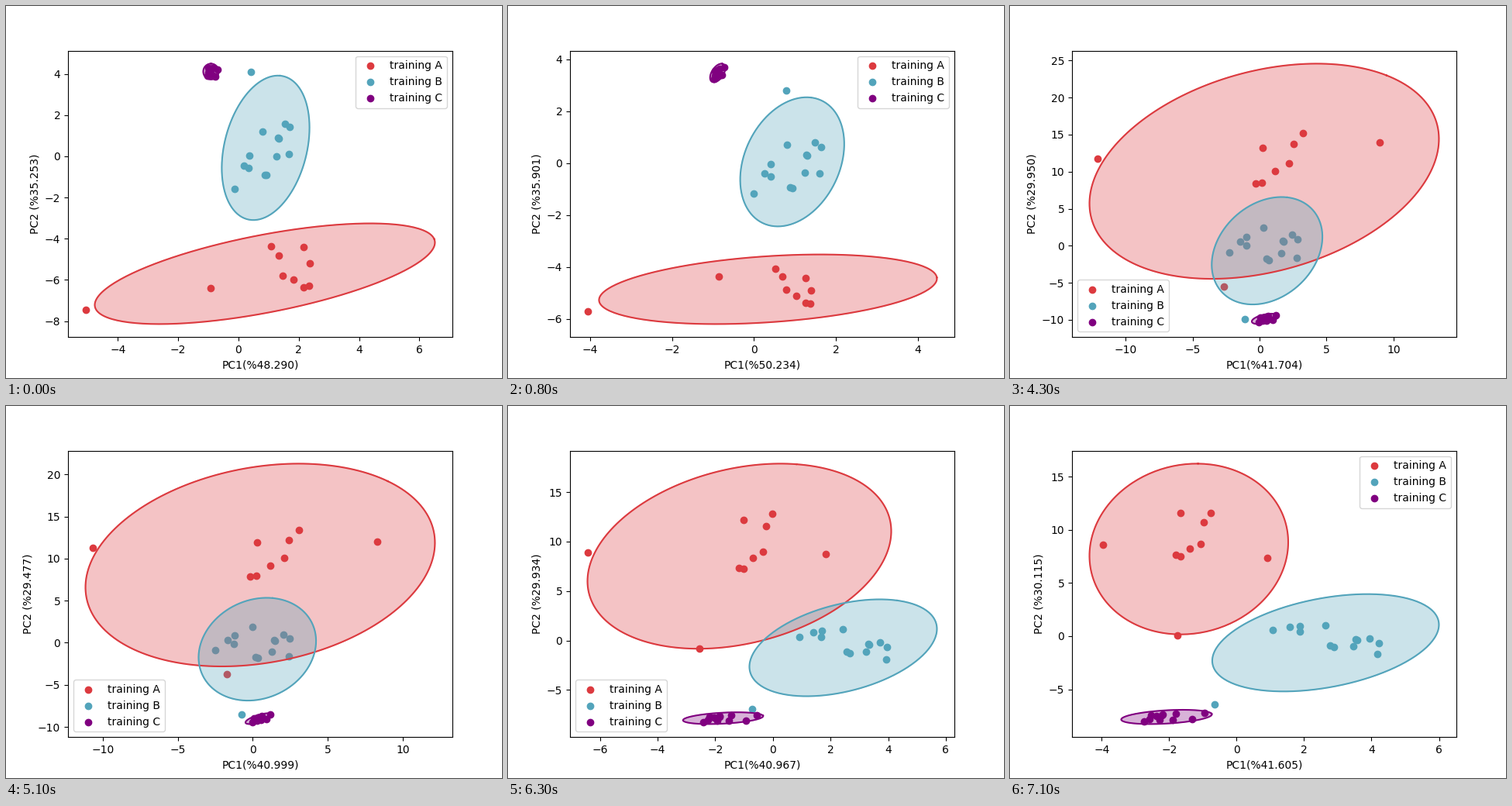
Recreate the animation shown at these times as a matplotlib script. Size 640 by 480 pixels, loop 8000 ms.

```python
import numpy as np
import matplotlib.pyplot as plt
from matplotlib.animation import FuncAnimation

STEP_MS = 100
FRAMES = 80
SECOND_START = 43
GROUPS = [("training A", "#dc3a3f", 10), ("training B", "#53a4bb", 14), ("training C", "purple", 11)]
CHI = np.sqrt(5.991)  # 95 % confidence, two degrees of freedom


def crowd(seed, count, center, half, rho, *outliers):
    """Scatter points around the outliers so that all together span the given ellipse."""
    center, (sx, sy) = np.array(center), np.array(half) / CHI
    spread = (count - 1) * np.array([[sx * sx, rho * sx * sy], [rho * sx * sy, sy * sy]])
    far = np.reshape(outliers, (-1, 2)) - center
    inner = count - len(far)
    shift = -far.sum(0) / inner
    rest = spread - far.T @ far - inner * np.outer(shift, shift)
    noise = np.random.default_rng(seed).uniform(-1, 1, (inner, 2))
    basis = np.linalg.qr(noise - noise.mean(0))[0]
    return np.vstack([far, shift + basis @ np.linalg.cholesky(rest).T]) + center


def pose(step, ratios, *ellipses):
    clouds = [crowd(seed, group[2], *ellipse)
              for seed, (group, ellipse) in enumerate(zip(GROUPS, ellipses))]
    return step, [np.array(ratios), *clouds]


# Each ellipse: center, half extents, correlation, then any outliers.
FIRST_RUN = [
    pose(0, (48.290, 35.253),
         ((0.874, -5.70), (5.642, 2.444), 0.62, (-5.076, -7.45)),
         ((0.90, 0.414), (1.455, 3.508), 0.28, (0.41, 4.10)),
         ((-0.913, 4.117), (0.257, 0.384), 0)),
    pose(5, (49.387, 35.650),
         ((0.266, -5.314), (4.473, 1.219), 0.28, (-4.655, -6.01)),
         ((0.838, 0.057), (1.213, 2.932), 0.25, (0.58, 3.46)),
         ((-0.833, 3.749), (0.19, 0.368), 0.5)),
    pose(12, (51.363, 36.236),
         ((0.444, -4.257), (3.713, 1.523), 0.32, (-3.285, -5.30)),
         ((1.063, 0.038), (1.356, 1.964), 0.26, (1.05, 1.90)),
         ((-0.959, 3.105), (0.18, 0.346), 0.5)),
]
SECOND_RUN = [
    pose(0, (41.704, 29.950),
         ((0.347, 10.06), (13.047, 14.52), 0.30, (-12.10, 11.76), (-2.66, -5.50)),
         ((0.561, -0.669), (4.132, 7.249), 0.26, (-1.10, -9.90)),
         ((0.405, -9.864), (0.984, 0.701), 0.5)),
    pose(8, (40.999, 29.477),
         ((0.491, 9.244), (11.64, 12.055), 0.22, (-10.66, 11.29), (-1.73, -3.73)),
         ((0.299, -0.765), (3.913, 6.111), 0.16, (-0.75, -8.53)),
         ((0.413, -9.023), (0.903, 0.645), 0.7)),
    pose(20, (40.967, 29.934),
         ((-1.161, 8.52), (5.268, 9.35), 0.27, (-6.42, 8.90), (-2.55, -0.81)),
         ((2.44, -0.736), (3.252, 4.894), 0.39, (-0.72, -6.92)),
         ((-1.726, -7.847), (1.39, 0.595), 0.35)),
    pose(28, (41.605, 30.115),
         ((-1.416, 8.202), (2.946, 8.034), 0.08, (-3.96, 8.61), (-1.76, 0.07)),
         ((2.638, -0.62), (3.36, 4.581), 0.37, (-0.65, -6.42)),
         ((-2.077, -7.60), (1.344, 0.671), 0.36)),
]


def state_at(frame):
    run, step = (FIRST_RUN, frame) if frame < SECOND_START else (SECOND_RUN, frame - SECOND_START)
    step = min(step, run[-1][0])
    for (t0, start), (t1, end) in zip(run, run[1:]):
        if step <= t1:
            k = (step - t0) / (t1 - t0)
            return [a + (b - a) * k for a, b in zip(start, end)]


def confidence_ellipse(pts):
    values, vectors = np.linalg.eigh(np.cov(pts.T))
    major = vectors[:, 1] * np.sign(vectors[1, 1])
    minor = np.array([-major[1], major[0]])
    t = np.linspace(0, 2 * np.pi, 200)[:, None]
    radii = CHI * np.sqrt(values)
    return (pts.mean(0) + radii[1] * np.cos(t) * major + radii[0] * np.sin(t) * minor).T


fig, ax = plt.subplots(figsize=(6.4, 4.8), dpi=100)


def draw(frame):
    ratios, *clouds = state_at(frame)
    ax.cla()
    for (label, color, _), pts in zip(GROUPS, clouds):
        ax.scatter(*pts.T, color=color, label=label)
    for (_, color, _), pts in zip(GROUPS, clouds):
        x, y = confidence_ellipse(pts)
        ax.fill(x, y, color=color, alpha=0.3)
        ax.plot(x, y, color=color)
    ax.set_xlabel(f"PC1(%{ratios[0]:.3f})")
    ax.set_ylabel(f"PC2 (%{ratios[1]:.3f})")
    ax.legend(loc="best")


anim = FuncAnimation(fig, draw, frames=FRAMES, interval=STEP_MS, repeat=True, repeat_delay=0)
plt.show()
```
